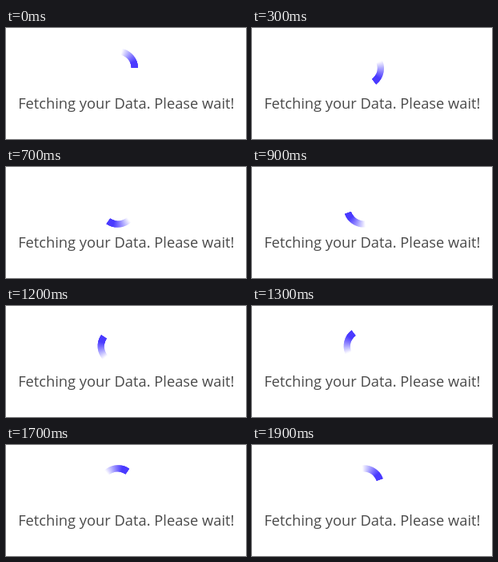
An HTML page for the animation above (2 s loop, 300 by 139 pixels).

```html
<!DOCTYPE html>
<html lang="en">
<head>
<meta charset="utf-8">
<title>Loading</title>
<style>
  html, body { margin: 0; width: 100%; height: 100%; overflow: hidden; background: #fff; }
  svg { display: block; width: 100%; height: 100%; }
  text { font: 18.3px "Open Sans", "Noto Sans", sans-serif; fill: #4a4a4a; }
</style>
</head>
<body>
<svg viewBox="0 0 300 139">
  <g id="spinner" fill="none" stroke="#4a3aff" stroke-width="8.2"></g>
  <text x="150.3" y="101" text-anchor="middle">Fetching your Data. Please wait!</text>
</svg>
<script>
  const LOOP = 2000, STEPS = 20;
  const CX = 139.8, CY = 50.4, RADIUS = 21.1;
  const HEAD = -1.5, SPAN = 76, SLICES = 38, GAIN = 1.35;
  const spinner = document.getElementById('spinner');

  const point = deg => {
    const a = deg * Math.PI / 180;
    return `${(RADIUS * Math.cos(a)).toFixed(3)} ${(RADIUS * Math.sin(a)).toFixed(3)}`;
  };

  // Each slice runs from its own start to the head, so the layers
  // build up opacity without seams between them.
  let before = 0;
  for (let i = 0; i < SLICES && before < 1; i++) {
    const alpha = Math.min(1, (i + 0.5) / SLICES * GAIN);
    const layer = (alpha - before) / (1 - before);
    const tail = HEAD - SPAN * (1 - i / SLICES);
    const arc = document.createElementNS('http://www.w3.org/2000/svg', 'path');
    arc.setAttribute('d', `M${point(tail)}A${RADIUS} ${RADIUS} 0 0 1 ${point(HEAD)}`);
    arc.setAttribute('stroke-opacity', layer.toFixed(4));
    spinner.append(arc);
    before = alpha;
  }

  function draw(ms) {
    const step = Math.floor((ms % LOOP) / LOOP * STEPS);
    spinner.setAttribute('transform', `translate(${CX} ${CY}) rotate(${step * 360 / STEPS})`);
  }

  const start = performance.now();
  function tick() {
    draw(performance.now() - start);
    requestAnimationFrame(tick);
  }
  draw(0);
  requestAnimationFrame(tick);
</script>
</body>
</html>
```
